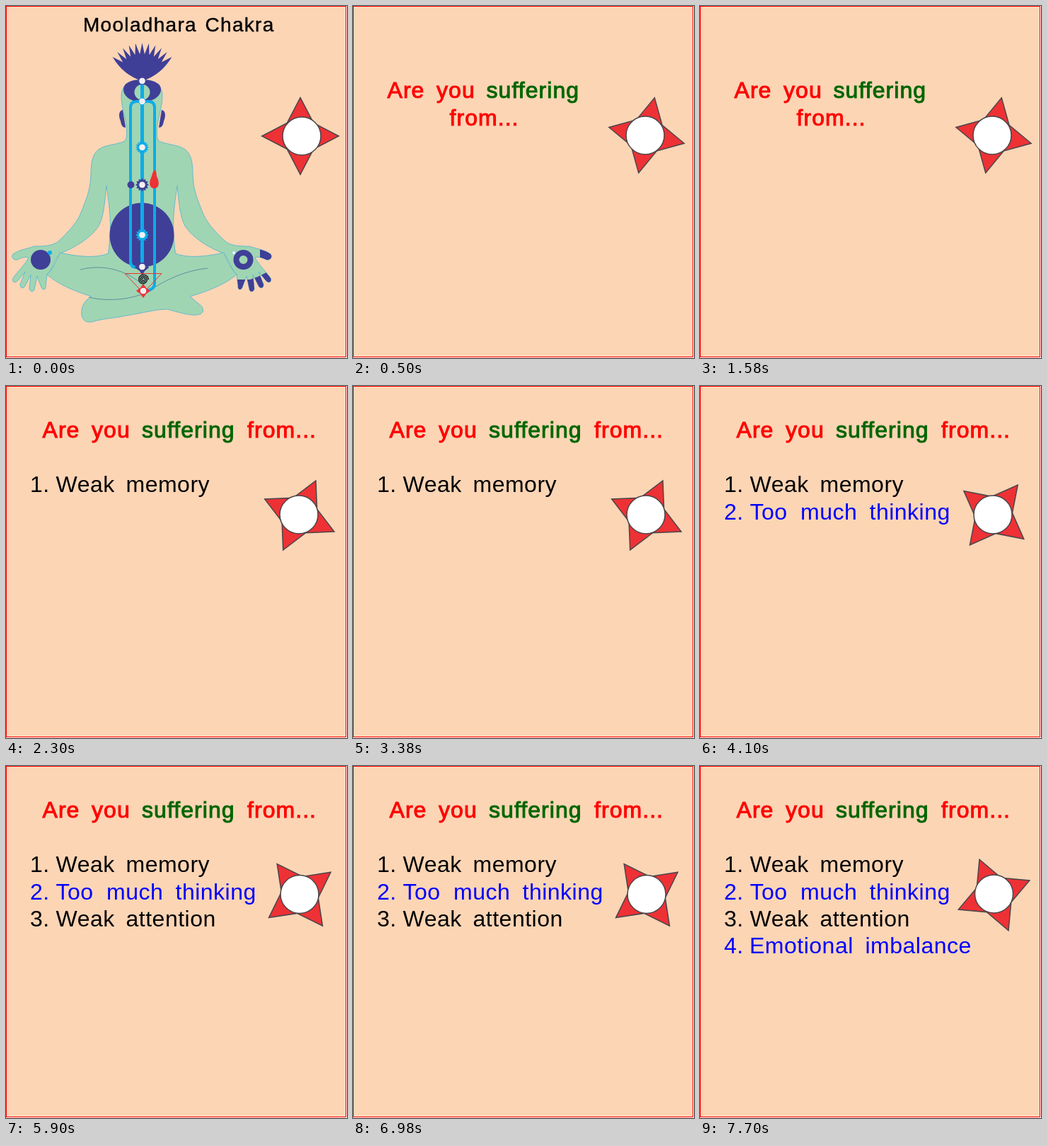
These frames come from a looping animation (482x498 px, 8000 ms). An HTML page:

```html
<!DOCTYPE html>
<html lang="en">
<head>
<meta charset="utf-8">
<title>Mooladhara Chakra</title>
<style>
  html, body { margin: 0; width: 100%; height: 100%; overflow: hidden; background: #fff; }
  svg { display: block; width: 482px; height: 498px; }
  text { font: 32px "Liberation Sans", Arial, sans-serif; letter-spacing: .5px; }
  .bold { letter-spacing: 1.05px; stroke-width: 1; }
  .red { fill: #f00; stroke: #f00; }
  .green { fill: #060; stroke: #060; }
  .title { font-size: 28px; letter-spacing: 1.3px; fill: #000; stroke: #000; stroke-width: .4; }
  .blue { fill: #00f; }
  .skin { fill: #a0d5b3; stroke: #62bccb; stroke-width: 1; }
  .navy { fill: #3f3f97; }
  .cyan { fill: #0cace8; }
  .dot { fill: #f1f1f4; }
  .tube { fill: none; stroke: #0cace8; }
  .line { fill: none; stroke: #5a8fa3; stroke-width: 1; }
</style>
</head>
<body>
<svg viewBox="0 0 482 498">
  <defs>
    <path id="half" d="M192,105 C174,105 163,113 163,127 C163,140 167,152 169,163
      C171,175 172,186 168,191 C155,197 140,196 131,203 C121,210 120,226 120,240
      C119,262 113,274 107,290 C101,306 90,318 74,333 C66,340 50,340 40,340
      C28,344 18,345 10,351 C7,355 10,360 16,359 C22,356 28,354 32,356
      C27,366 18,374 10,385 C8,391 13,393 17,388 L27,376 L20,394 C20,400 25,400 27,396
      L35,380 L33,400 C34,405 39,405 40,401 L44,382 L50,398 C52,403 57,401 56,396
      L58,380 C66,372 68,360 76,350 C98,342 121,327 131,311 C138,298 139,282 142,254
      C145,275 149,300 147,325 L145,350 H192"/>
    <clipPath id="hand"><use href="#half" transform="matrix(-1 0 0 1 384 0)"/></clipPath>
  </defs>
  <rect x=".5" y=".5" width="480" height="496" fill="#fcd5b5" stroke="#f00"/>

  <g id="figure">
    <text class="bold title" y="36"><tspan x="109">Mooladhara</tspan><tspan x="281.500">Chakra</tspan></text>
    <g class="navy">
      <path id="ear" d="M165,147 C159,148 159,156 162,163 C163,169 165,172 169,172 Z"/>
      <use href="#ear" transform="matrix(-1 0 0 1 385 0)"/>
    </g>
    <use href="#half" class="skin"/>
    <use href="#half" class="skin" transform="matrix(-1 0 0 1 384 0)"/>
    <path id="crown" class="navy"/>
    <path class="skin" d="M145,345 V350 C128,357 103,355 76,349 C72,360 67,371 58,380
      C72,392 92,402 121,411 C110,416 104,430 108,441 C112,449 120,448 128,445
      C142,442 155,441 170,438 C195,434 212,429 228,429 C243,433 258,438 270,437
      C281,436 281,427 272,421 L260,411 C290,402 312,392 326,380 C317,371 312,360 308,349
      C281,355 256,357 239,350 V345"/>
    <path class="line" d="M117,412 C145,419 181,415 202,403 C225,388 253,374 285,371 M105,373 C140,364 170,376 188,390"/>
    <g clip-path="url(#hand)" class="navy">
      <path d="M359,340 H380 V362 H359 Z M318,387 H345 L356,383 370,376 H380 V410 H318 Z"/>
    </g>
    <circle class="navy" cx="49" cy="359" r="14"/>
    <circle class="cyan" cx="62" cy="349" r="3"/>
    <circle cx="335.500" cy="359" r="10" fill="#a0d5b3" stroke="#3f3f97" stroke-width="8"/>
    <circle cx="322" cy="349" r="2.500" fill="#fff" stroke="#7cc9d3"/>

    <path class="navy" d="M166,118 C166,108 179,104 192,104 S219,108 219,118 C219,129 205,136 192,136 S166,129 166,118 Z"/>
    <circle cx="192.500" cy="122" r="11" fill="#a0d5b3"/>
    <circle class="navy" cx="192" cy="324" r="45.500"/>
    <path class="tube" stroke-width="4" d="M192,135 H185 Q176,135 176,144 V361 Q176,370 185,370 H192 M192,135 H201 Q210,135 210,144 V392 Q210,403 194,403"/>
    <path class="tube" stroke-width="5" d="M192.500,106 V369"/>
    <circle class="navy" cx="176.500" cy="253" r="5"/>
    <path fill="#ee3135" d="M210,232 C215,237 211,239 214,243 C218,252 215,258 209.500,258 S201,252 205,243 C207,239 206,236 210,232 Z"/>
    <path class="navy" d="M182,370 L188,363 H197 L202,370 196,375 192.500,381 189,375 Z"/>
    <path fill="none" stroke="#ee3135" d="M168,378.500 H220 L194,406 Z"/>
    <g id="wheels"></g>
    <path id="coil" fill="none" stroke="#20242a" stroke-width="1.500"/>
  </g>

  <text id="intro" class="bold">
    <tspan class="red" x="48.500" y="130">Are</tspan><tspan class="red" x="118">you</tspan><tspan class="green" x="188.500">suffering</tspan><tspan class="red" x="136.500" y="169">from...</tspan>
  </text>
  <g id="list">
    <text class="bold" y="73"><tspan class="red" x="51.500">Are</tspan><tspan class="red" x="121">you</tspan><tspan class="green" x="192">suffering</tspan><tspan class="red" x="341">from...</tspan></text>
    <text class="item" y="150"><tspan x="34">1.</tspan><tspan x="70.500">Weak</tspan><tspan x="169.500">memory</tspan></text>
    <text class="item blue" y="189"><tspan x="34">2.</tspan><tspan x="70.500">Too</tspan><tspan x="142">much</tspan><tspan x="239.500">thinking</tspan></text>
    <text class="item" y="227"><tspan x="34">3.</tspan><tspan x="70.500">Weak</tspan><tspan x="169.500">attention</tspan></text>
    <text class="item blue" y="265"><tspan x="34">4.</tspan><tspan x="70">Emotional</tspan><tspan x="233.500">imbalance</tspan></text>
  </g>

  <g stroke="#4a4649" stroke-width="1.500">
    <path id="star" fill="#ee3135"/>
    <circle id="hub" r="27" fill="#fff"/>
  </g>
</svg>
<script>
const $ = id => document.getElementById(id);
const LOOP = 8000;
const starts = [0, 500, 2300, 4100, 5900, 7700];
// Star centre, turn in degrees, hub centre
const poses = [
  [416, 184, 0, 418, 184],
  [415, 183, 12, 413, 183],
  [414.8, 183, 25.2, 414, 182],
  [415.3, 182.5, 38.6, 414, 182],
  [415.3, 182.4, 53.7, 415, 181.5],
  [415.5, 182.5, 67.8, 415.5, 181]
];

// Closed outline alternating between two radii
function spikes(n, outer, inner) {
  const points = Array.from({ length: 2 * n }, (_, i) => {
    const a = Math.PI * i / n, r = i % 2 ? inner : outer;
    return `${(r * Math.sin(a)).toFixed(2)},${(-r * Math.cos(a)).toFixed(2)}`;
  });
  return `M${points.join("L")}Z`;
}

function crown() {
  let d = "M192.5,106 Q166,98 150.5,72";
  for (let i = 1; i <= 20; i++) {
    const a = (-51 + 5.1 * i) * Math.PI / 180;
    const r = i % 2 ? 38 : 54;
    d += `L${192.5 + r * Math.sin(a)},${106 - r * Math.cos(a)}`;
  }
  return d + "Q219,98 192.5,106Z";
}

function coil() {
  let d = "";
  for (let a = 0; a <= 19; a += 0.3) {
    const r = 0.8 + a * 0.35;
    d += `${d ? "L" : "M"}${194 + r * Math.cos(a)},${387 + r * Math.sin(a)}`;
  }
  return d;
}

function wheel(x, y, color, n, outer, inner) {
  const rim = n ? `<path d="${spikes(n, outer, inner)}" fill="${color}"/>` : "";
  return `<g transform="translate(${x} ${y})">${rim}<circle class="dot" r="4.8" stroke="${color}"/></g>`;
}

const navy = "#3f3f97", cyan = "#0cace8";
$("crown").setAttribute("d", crown());
$("coil").setAttribute("d", coil());
$("star").setAttribute("d", spikes(4, 54.3, 26.3));
$("wheels").innerHTML =
  wheel(192.5, 106, navy) + wheel(192.5, 135, cyan) +
  wheel(192.5, 200, cyan, 16, 9.5, 7) + wheel(192.5, 253, navy, 12, 9.5, 7) +
  wheel(192.5, 324, cyan, 12, 9.5, 7) + wheel(192.5, 369, navy) +
  wheel(194, 403, "#ee3135", 4, 10, 6);

const items = document.querySelectorAll(".item");
const show = (el, on) => el.style.display = on ? "" : "none";

function draw(t) {
  const step = starts.filter(s => s <= t).length - 1;
  const [x, y, turn, hx, hy] = poses[step];
  show($("figure"), step === 0);
  show($("intro"), step === 1);
  show($("list"), step > 1);
  items.forEach((item, i) => show(item, step >= i + 2));
  $("star").setAttribute("transform", `translate(${x} ${y}) rotate(${turn})`);
  $("hub").setAttribute("transform", `translate(${hx} ${hy})`);
}

const begin = performance.now();
function tick() {
  draw((performance.now() - begin) % LOOP);
  requestAnimationFrame(tick);
}
tick();
</script>
</body>
</html>
```
